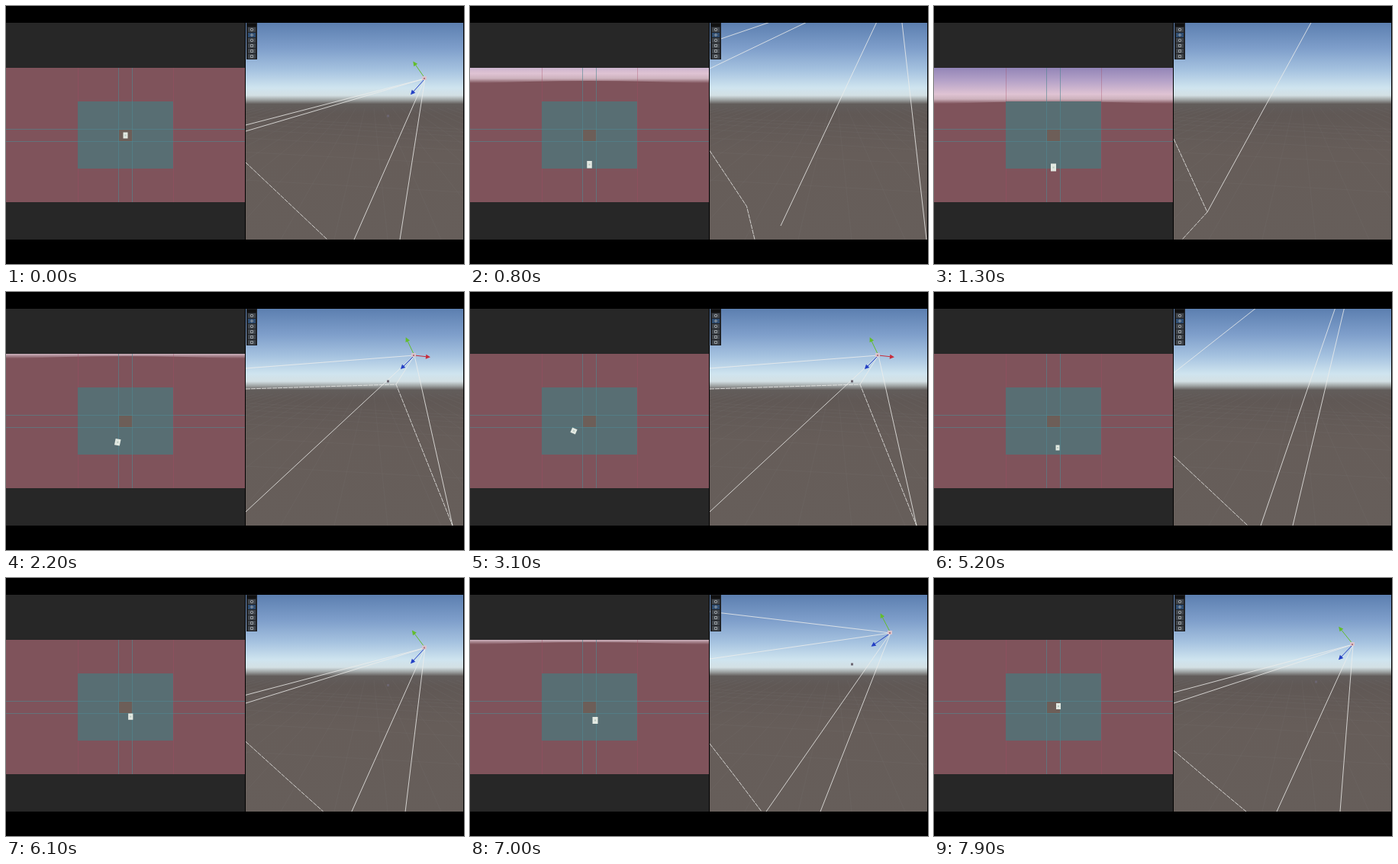
These frames come from a looping animation (600 px wide and 338 px high, 8 s). An HTML page with a canvas:

```html
<!DOCTYPE html>
<html lang="en">
<head>
<meta charset="utf-8">
<title>Camera dead zone</title>
<style>
  html, body { margin: 0; width: 100%; height: 100%; overflow: hidden; background: #000; }
  canvas { display: block; width: 600px; height: 338px; }
</style>
</head>
<body>
<canvas id="stage" width="600" height="338"></canvas>
<script>
const ctx = document.getElementById('stage').getContext('2d');
const LOOP = 8000, STEP = 100;
const LEFT = 314, TOP = 22, BOTTOM = 306;

// Scene-view poses: eye, gizmo tips, frustum rays and far-plane outline.
// left: y where upper ray, lower ray and far edge meet the left border.
const start = { eye: [549, 95], dot: [144], green: [535, 75], blue: [532, 114], red: [3],
  left: [156, 164, 205], ray: [456, 306, 516, 306], far: [367, 255, 421, 306] };
const raised = { ...start, eye: [549, 46], dot: [95], green: [535, 27], blue: [532, 65] };
const above = { eye: [570, -117], dot: [-60], green: [560, -140], blue: [550, -95], red: [3],
  left: [-60, 0, 174], ray: [358, 270, 680, 306], far: [358, 270, 325, 306] };
const turned = { eye: [535, 83], dot: [117], green: [525, 62], blue: [519, 99], red: [18],
  left: [100, 288, 127], ray: [511, 121, 585, 306], far: [511, 121, 585, 306] };
const high = { eye: [552, 51], dot: [71], green: [540, 29], blue: [530, 67], red: [3],
  left: [4, 104, 251], ray: [384, 306, 489, 306], far: [338, 278, 363, 306] };
const away = { eye: [564, -91], dot: [-50], green: [552, -113], blue: [540, -75], red: [3],
  left: [-20, 106, 215], ray: [428, 306, 470, 306], far: [362, 260, 411, 306] };
const settling = { eye: [551, 72], dot: [113], green: [539, 49], blue: [528, 88], red: [3],
  left: [44, 106, 217], ray: [388, 306, 459, 306], far: [348, 261, 382, 306] };
const end = { eye: [549, 87], dot: [136], green: [532, 66], blue: [532, 105], red: [3],
  left: [150, 164, 226], ray: [449, 306, 532, 306], far: [361, 266, 409, 306] };

const poseKeys = [[0, start], [200, raised], [300, raised], [1300, above], [2100, turned],
  [3100, turned], [4400, high], [5200, away], [5700, start], [6600, end],
  [7000, settling], [7600, start], [7900, end]];

// x, y, width, height, tilt
const cubeKeys = [[0, [156.5, 169.5, 6, 8, 0]], [200, [156.5, 204, 6, 9, 0]], [300, [156.5, 204, 6, 9, 0]],
  [1300, [156.5, 211.5, 7, 10, 0]], [3100, [136, 182, 7, 7, .4]], [3500, [112, 165, 7, 8, .3]],
  [4400, [171, 130.5, 8, 10, .08]], [5200, [162, 204, 5, 7, 0]], [5800, [163, 180, 6, 8, 0]],
  [7000, [164, 186.5, 7, 9, 0]], [7900, [163, 168, 6, 8, 0]]];

const horizonKeys = [[0, [70]], [300, [70]], [1300, [124]], [2400, [74]], [4400, [74]], [4800, [90]],
  [5200, [70]], [6600, [70]], [7000, [83]], [7500, [70]], [7900, [70]]];

const mix = (a, b, k) => a.map((v, i) => v + (b[i] - v) * k);

function segment(keys, t) {
  let i = 0;
  while (i < keys.length - 2 && t >= keys[i + 1][0]) i++;
  const [t0, a] = keys[i], [t1, b] = keys[i + 1];
  return [a, b, Math.min(1, (t - t0) / (t1 - t0))];
}
const sample = (keys, t) => mix(...segment(keys, t));
function samplePose(t) {
  const [a, b, k] = segment(poseKeys, t);
  return Object.fromEntries(Object.keys(a).map(name => [name, mix(a[name], b[name], k)]));
}

function rect(color, x, y, w, h) {
  ctx.fillStyle = color;
  ctx.fillRect(x, y, w, h);
}
function line(color, points, width = 1, dash = []) {
  ctx.strokeStyle = color;
  ctx.lineWidth = width;
  ctx.setLineDash(dash);
  ctx.beginPath();
  points.forEach(([x, y]) => ctx.lineTo(x, y));
  ctx.stroke();
}
function gradient(y0, y1, stops) {
  const g = ctx.createLinearGradient(0, y0, 0, y1);
  stops.forEach(([at, color]) => g.addColorStop(at, color));
  return g;
}
function clipped(x, y, w, h, draw) {
  ctx.save();
  ctx.beginPath();
  ctx.rect(x, y, w, h);
  ctx.clip();
  draw();
  ctx.restore();
}

function drawGameView(t) {
  const [horizon] = sample(horizonKeys, t);
  const [x, y, w, h, tilt] = sample(cubeKeys, t);
  rect('#272727', 0, TOP, 313, BOTTOM - TOP);
  clipped(0, 81, 313, 176, () => {
    rect('#7f535b', 0, 81, 313, 176);
    if (horizon > 76) {
      ctx.fillStyle = gradient(horizon - 46, horizon + 4, [[0, '#8d80b4'], [.4, '#b5a2c8'],
        [.75, '#dfc3d3'], [.88, '#cdb2bd'], [1, '#7f535b']]);
      ctx.beginPath();
      ctx.moveTo(0, 0);
      ctx.lineTo(313, 0);
      ctx.lineTo(313, horizon + 5);
      ctx.quadraticCurveTo(156, horizon - 3, 0, horizon + 5);
      ctx.fill();
    }
    for (const gx of [94, 219]) line('rgba(165,75,100,.35)', [[gx + .5, 81], [gx + .5, 257]]);
    rect('#586e73', 94, 125, 125, 88);
    rect('#6d5e58', 148, 162, 18, 15);
    const guide = 'rgba(80,135,145,.6)';
    for (const gx of [147.5, 165.5]) line(guide, [[gx, 81], [gx, 257]]);
    for (const gy of [161.5, 177.5]) line(guide, [[0, gy], [313, gy]]);
    ctx.save();
    ctx.translate(x, y);
    ctx.rotate(tilt);
    rect('#e3e9e2', -w / 2, -h / 2, w, h);
    rect('#b9c9c0', -1, -1, 2, 2);
    ctx.restore();
  });
}

function drawWorld() {
  ctx.fillStyle = gradient(TOP, BOTTOM, [[0, '#5c7fb0'], [.12, '#7f9fcb'], [.22, '#a6c3e0'],
    [.3, '#cfe4ef'], [.335, '#d3e0e4'], [.355, '#a0a5a5'], [.375, '#625d5b'],
    [.42, '#605855'], [.6, '#665d59'], [1, '#665e5a']]);
  ctx.fillRect(LEFT, TOP, 285, BOTTOM - TOP);
  const grid = 'rgba(140,140,135,.1)';
  for (let i = -14; i <= 14; i++) line(grid, [[470 + i * 12, 134], [430 + i * 70, BOTTOM]]);
  for (let i = 1; i < 9; i++) {
    const y = 126 + 220 / i;
    line(grid, [[LEFT, y - 8], [599, y + 8]]);
  }
}

function drawArrow(color, [x0, y0], [x1, y1]) {
  line(color, [[x0, y0], [x1, y1]]);
  ctx.save();
  ctx.translate(x1, y1);
  ctx.rotate(Math.atan2(y1 - y0, x1 - x0));
  ctx.fillStyle = color;
  ctx.beginPath();
  ctx.moveTo(3, 0);
  ctx.lineTo(-3, -3);
  ctx.lineTo(-3, 3);
  ctx.fill();
  ctx.restore();
}

function drawFrustum({ eye, dot, green, blue, red, left, ray, far }) {
  const white = 'rgba(238,238,235,.8)';
  const [upper, lower, edge] = left;
  const corners = [[LEFT, upper], [LEFT, lower], ray.slice(0, 2), ray.slice(2)];
  corners.forEach(corner => line(white, [eye, corner]));
  line(white, [[LEFT, edge], far.slice(0, 2), far.slice(2)], 1, [6, 1]);

  const [x, y] = eye;
  rect('#6b6570', 499, dot[0] - 1.5, 3, 3);
  drawArrow('#63bd2c', eye, green);
  drawArrow('#233fc4', eye, blue);
  if (red[0] > 6) drawArrow('#c72d3c', eye, [x + red[0], y + 2]);
  rect('#d8c4cd', x - 4, y - 3, 6, 5);
  rect('#ad7480', x - 2, y - 1, 2, 2);
}

function drawToolbar() {
  rect('#202226', 315, TOP, 14, 48);
  rect('#111', 316, 23, 12, 4);
  for (let i = 0; i < 6; i++) {
    const y = 28 + i * 7;
    rect(i === 1 ? '#2e4c70' : '#41464c', 317, y, 10, 6);
    ctx.strokeStyle = '#aeb3b7';
    ctx.lineWidth = .8;
    ctx.setLineDash([]);
    ctx.beginPath();
    if (i === 1) {
      ctx.moveTo(319.5, y + 3);
      ctx.lineTo(324.5, y + 3);
      ctx.moveTo(322, y + .7);
      ctx.lineTo(322, y + 5.3);
    } else if (i < 3) {
      ctx.arc(322, y + 3, 1.7, 0, 7);
    } else {
      ctx.rect(320.5, y + 1.5, 3, 3);
    }
    ctx.stroke();
  }
}

function frame(now) {
  const t = Math.floor(now % LOOP / STEP) * STEP;
  rect('#000', 0, 0, 600, 338);
  drawGameView(t);
  clipped(LEFT, TOP, 285, BOTTOM - TOP, () => {
    drawWorld();
    drawFrustum(samplePose(t));
    drawToolbar();
  });
  requestAnimationFrame(frame);
}

const began = performance.now();
const tick = frame;
tick(performance.now() - began);
</script>
</body>
</html>
```
